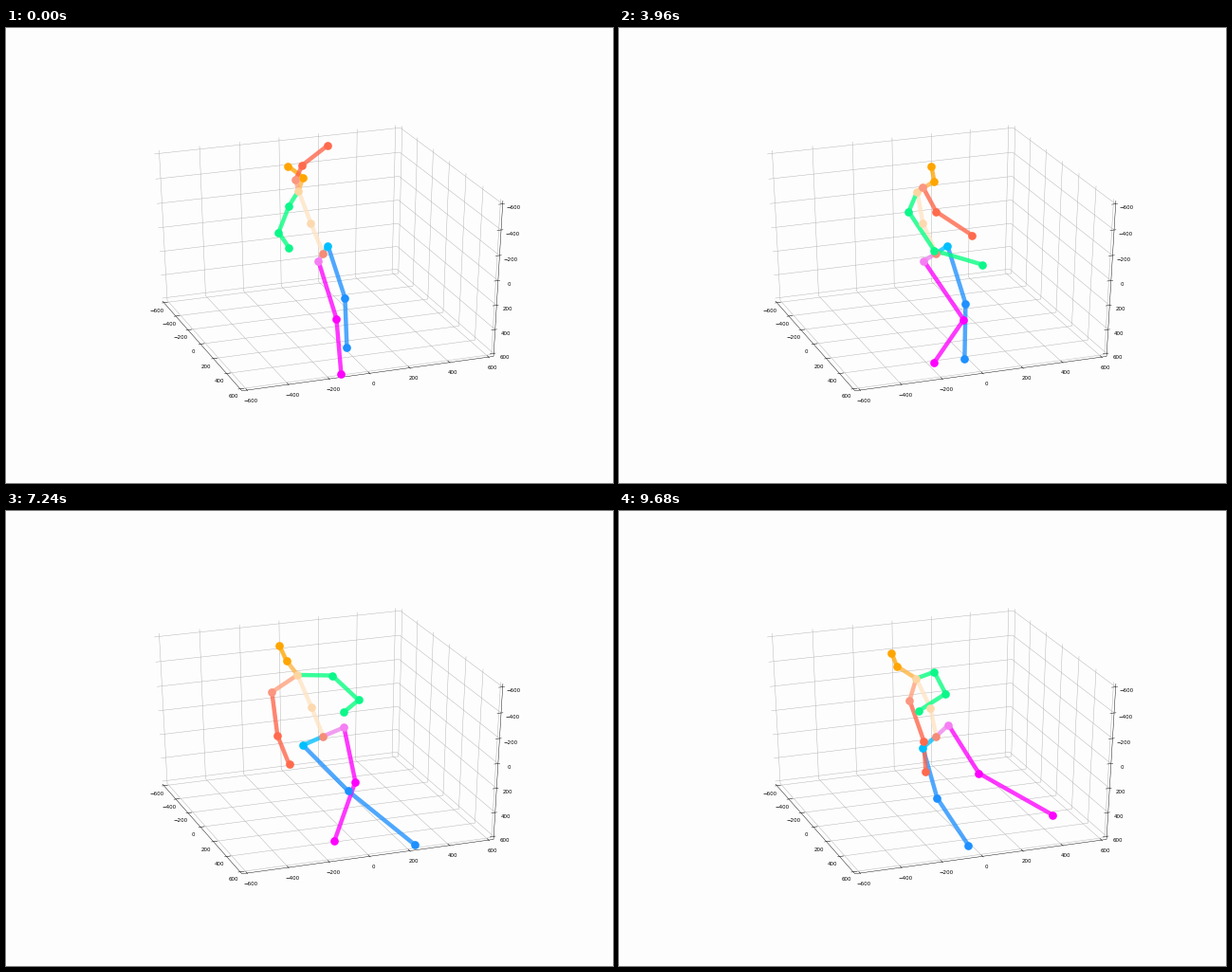
Animation, 640 px wide and 480 px high, one loop 9.72 s. Source, as a matplotlib script:

```python
import numpy as np
import matplotlib.pyplot as plt
from matplotlib.animation import FuncAnimation
from matplotlib.collections import LineCollection

W, H, DPI = 640, 480, 40
FRAMES, INTERVAL = 243, 40
EDGE = 625          # box half-width, a little past the last tick
TICKS = range(-600, 601, 200)

fig = plt.figure(figsize=(W / DPI, H / DPI), dpi=DPI, facecolor="#fdfdfd")
ax = fig.add_axes([0, 0, 1, 1])
ax.set_xlim(0.6, W + 0.6)
ax.set_ylim(H + 0.3, 0.3)
ax.axis("off")

# --- perspective view of the box -----------------------------------------
TURN, TILT = np.radians(20), np.radians(30)
S, C, SE, CE = np.sin(TURN), np.cos(TURN), np.sin(TILT), np.cos(TILT)
RIGHT = np.array([C, S, 0])
UP = np.array([S * SE, -C * SE, -CE])
EYE = np.array([-S * CE, C * CE, -SE])


def project(x, y, z):
    p = np.array([x, y, z]) / 1200
    depth = 10 - p @ EYE
    return 335.5 + 2681 * (p @ RIGHT) / depth, 238.2 - 1787 * (p @ UP) / depth


def path(*points):
    return [project(*p) for p in points]


def label(value, point, dx, dy):
    x, y = project(*point)
    ax.text(x + dx, y + dy, str(value).replace("-", "\u2212"), fontsize=10,
            family="DejaVu Sans", ha="center", va="center", zorder=3)


E = EDGE
grid, marks = [], []
for t in TICKS:
    grid += [path((t, E, E), (t, -E, E), (t, -E, -E)),
             path((-E, t, E), (E, t, E), (E, t, -E)),
             path((-E, -E, t), (E, -E, t), (E, E, t))]
    marks += [path((t, E + 10, E), (t, E - 20, E)),
              path((-E - 10, t, E), (20 - E, t, E)),
              path((E + 10, E, t), (E - 20, E, t))]
    label(t, (t, E, E), 3.8, 11)
    label(t, (-E, t, E), -7.5, 8.3)
    label(t, (E, E, t), 11.7, 4.3)
marks += [path((-E, E, E), (E, E, E)),
          path((-E, -E, E), (-E, E, E)),
          path((E, E, -E), (E, E, E))]
ax.add_collection(LineCollection(grid, colors="#b0b0b0", linewidths=0.8, zorder=1))
ax.add_collection(LineCollection(marks, colors="black", linewidths=0.8, zorder=2))

# --- key poses -------------------------------------------------------------
# legs: hip, knee, ankle; trunk: spine, thorax, neck, head;
# arms: shoulder, elbow, wrist
keys = {name: {} for name in ("l_leg", "r_leg", "trunk", "l_arm", "r_arm")}


def pose(frame, **limbs):
    for name, points in limbs.items():
        keys[name][frame] = points


pose(0, l_leg=[(340, 230), (358, 285), (360, 337)],
     r_leg=[(330, 246), (349, 307), (354, 365)],
     trunk=[(322, 206), (309, 172), (314, 158), (298, 146)],
     l_arm=[(306, 160), (313, 145), (340, 124)],
     r_arm=[(299, 188), (288, 216), (299, 232)])
pose(25, l_arm=[(309, 166), (320, 177), (357, 160)],
     r_leg=[(331, 246), (349, 306), (353, 364)])
pose(35, l_arm=[(312, 169), (324, 190), (371, 194)])
pose(46, l_leg=[(338, 231), (362, 282), (355, 330)],
     r_leg=[(332, 245), (348, 303), (349, 358)],
     trunk=[(322, 205), (316, 173), (327, 160), (318, 146)],
     l_arm=[(315, 170), (322, 198), (354, 226)],
     r_arm=[(310, 198), (308, 242), (342, 267)])
pose(62, l_leg=[(342, 230), (380, 281), (385, 334)],
     r_leg=[(328, 245), (346, 303), (336, 354)])
pose(75, l_leg=[(347, 230), (386, 286), (427, 344)],
     r_leg=[(323, 246), (347, 304), (311, 347)])
pose(85, l_leg=[(348, 230), (380, 289), (410, 352)],
     r_leg=[(321, 246), (350, 305), (289, 341)])
pose(99, l_leg=[(347, 230), (366, 291), (365, 349)],
     r_leg=[(322, 246), (364, 308), (333, 353)],
     trunk=[(321, 206), (315, 173), (333, 162), (330, 146)],
     l_arm=[(321, 168), (335, 194), (373, 219)],
     r_arm=[(306, 194), (333, 235), (384, 250)])
pose(112, l_leg=[(337, 231), (357, 291), (329, 349)],
     r_leg=[(332, 245), (386, 302), (383, 355)])
pose(119, r_leg=[(338, 245), (393, 298), (413, 362)])
pose(125, l_leg=[(327, 232), (344, 289), (295, 342)],
     r_leg=[(343, 244), (392, 296), (400, 357)],
     trunk=[(321, 207), (318, 174), (336, 160), (336, 145)],
     l_arm=[(295, 172), (280, 204), (299, 231)],
     r_arm=[(336, 193), (369, 229), (410, 234)])
pose(135, l_leg=[(320, 234), (336, 290), (281, 335)])
pose(147, l_leg=[(313, 238), (338, 289), (322, 334)])
pose(159, l_leg=[(310, 241), (346, 288), (382, 341)],
     r_leg=[(360, 235), (380, 297), (367, 365)],
     trunk=[(320, 207), (308, 173), (306, 156), (301, 140)],
     l_arm=[(272, 187), (268, 231), (291, 259)],
     r_arm=[(349, 179), (384, 207), (384, 213)])
pose(172, l_leg=[(311, 245), (362, 290), (421, 349)],
     r_leg=[(359, 231), (376, 290), (352, 357)])
pose(188, l_leg=[(316, 249), (357, 300), (433, 354)],
     r_leg=[(355, 227), (364, 283), (350, 342)])
pose(203, l_leg=[(320, 251), (346, 307), (420, 354)],
     r_leg=[(350, 225), (362, 278), (389, 330)],
     trunk=[(326, 207), (310, 174), (292, 161), (282.5, 146)],
     l_arm=[(296, 194), (310, 239), (311, 272)],
     r_arm=[(337, 171), (356, 196), (332, 215)])
pose(225, r_leg=[(348, 225), (374, 277), (430, 322)],
     trunk=[(328, 207), (311, 175), (291, 162), (279, 148)])
pose(236, r_leg=[(348, 226), (380, 277), (461, 321)])
pose(242, l_leg=[(321, 250), (336, 303), (369, 353)],
     r_leg=[(348, 226), (380, 277), (458, 321)],
     trunk=[(329, 208), (314, 177), (293.5, 164), (288, 150)],
     l_arm=[(307, 200), (322, 243), (324, 275)],
     r_arm=[(333, 170), (345, 193), (317, 211)])


def smooth(poses):
    """Cubic Hermite curve through the key poses, sampled at every frame."""
    t = np.array(sorted(poses), float)
    p = np.array([poses[k] for k in sorted(poses)], float)
    slope = np.gradient(p, t, axis=0)
    f = np.arange(FRAMES)
    i = np.clip(np.searchsorted(t, f, side="right") - 1, 0, len(t) - 2)
    d = (t[i + 1] - t[i])[:, None, None]
    u = (f - t[i])[:, None, None] / d
    return ((2 * u**3 - 3 * u**2 + 1) * p[i] + (u**3 - 2 * u**2 + u) * d * slope[i]
            + (3 * u**2 - 2 * u**3) * p[i + 1] + (u**3 - u**2) * d * slope[i + 1])


motion = {name: smooth(poses) for name, poses in keys.items()}
PELVIS = np.array([[335, 238]])

# --- skeleton --------------------------------------------------------------
BONES = {
    "l_leg": ["deepskyblue", "dodgerblue", "dodgerblue"],
    "r_leg": ["violet", "magenta", "magenta"],
    "trunk": ["bisque", "bisque", "#ffb340", "orange"],
    "l_arm": ["lightsalmon", "tomato", "tomato"],
    "r_arm": ["springgreen"] * 3,
}
JOINTS = {
    "l_leg": ["deepskyblue", "dodgerblue", "dodgerblue"],
    "r_leg": ["#f57ff2", "magenta", "magenta"],
    "trunk": ["#fcd9ae", "#fdd5a0", "orange", "orange"],
    "l_arm": ["#fb9680", "#ff6a4d", "#ff6a4d"],
    "r_arm": ["#0cf78a"] * 3,
}


def dot(color, z):
    return ax.plot([], [], "o", ms=15.6, mew=0, color=color, zorder=z)[0]


def bone(color, z):
    return ax.plot([], [], color=color, lw=8, alpha=0.78, zorder=z,
                   solid_capstyle="butt")[0]


# every joint lies above every bone
bones, joints = {}, {}
for layer, name in enumerate(BONES):
    bones[name] = [bone(c, 10 + layer) for c in BONES[name]]
    joints[name] = [dot(c, 20 + layer) for c in JOINTS[name]]
root = dot("#f58c78", 22)
root.set_data(*PELVIS.T)


def draw(frame):
    thorax = motion["trunk"][frame, 1:2]
    for name, track in motion.items():
        start = thorax if name.endswith("arm") else PELVIS
        chain = np.vstack([start, track[frame]])
        for i, (line, joint) in enumerate(zip(bones[name], joints[name])):
            line.set_data(*chain[i:i + 2].T)
            joint.set_data(*chain[i + 1:i + 2].T)
    return [a for group in (bones, joints) for limb in group.values() for a in limb]


anim = FuncAnimation(fig, draw, frames=FRAMES, interval=INTERVAL,
                     repeat=True, repeat_delay=0)
plt.show()
```
